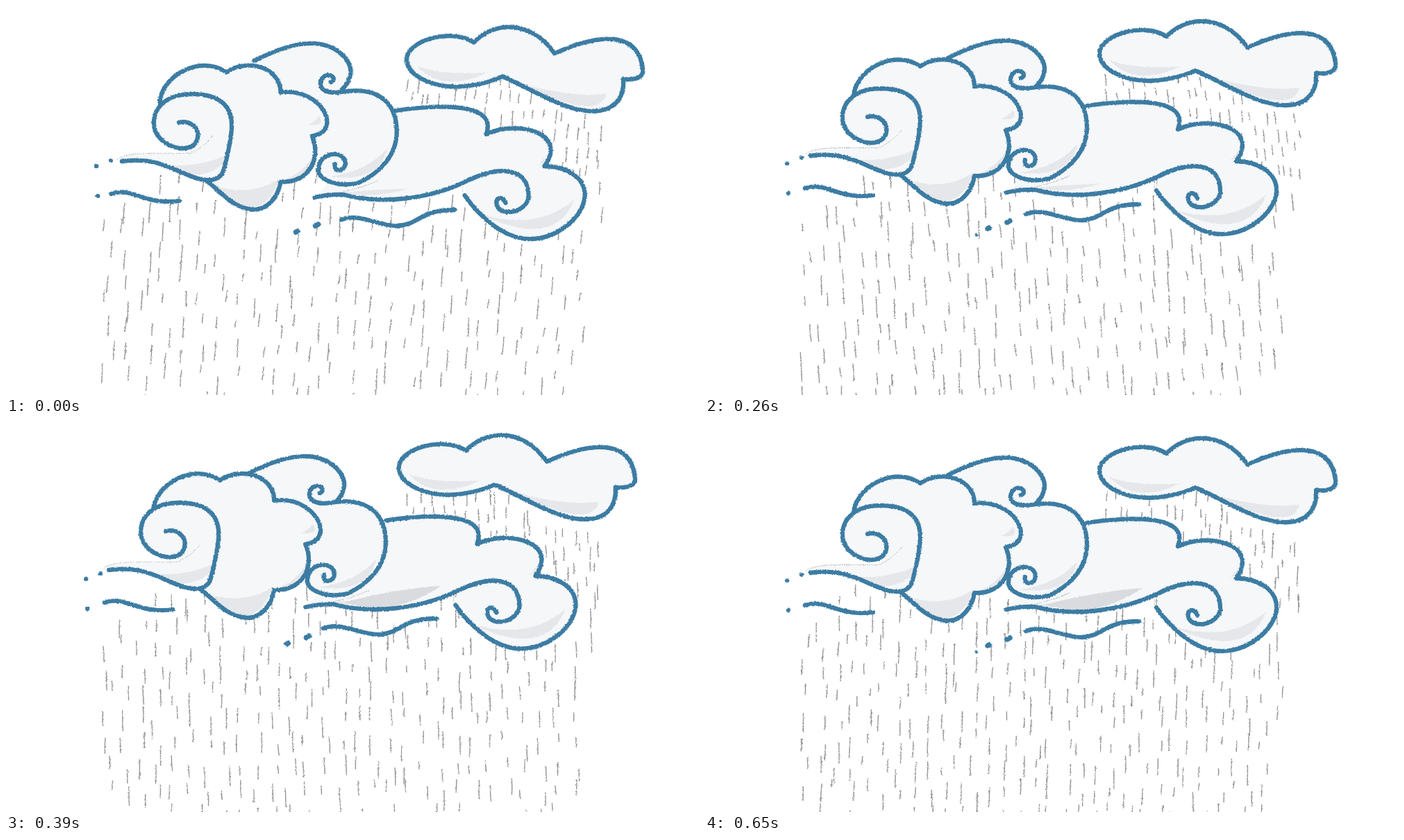
An HTML page for the animation above (780 ms loop, 998x561 px).

```html
<!DOCTYPE html>
<html lang="en">
<head>
<meta charset="utf-8">
<title>Rain clouds</title>
<style>
  html, body { margin: 0; width: 100%; height: 100%; overflow: hidden; background: #fff; }
  svg { display: block; width: 100%; height: 100%; }
</style>
</head>
<body>
<svg id="stage" viewBox="0 0 998 561">
  <defs>
    <filter id="chalk" filterUnits="userSpaceOnUse" x="0" y="0" width="998" height="561" color-interpolation-filters="sRGB">
      <feTurbulence type="fractalNoise" baseFrequency=".4" numOctaves="2" seed="4"/>
      <feDisplacementMap in="SourceGraphic" scale="3" xChannelSelector="R" yChannelSelector="G"/>
    </filter>
  </defs>
  <g id="scene" filter="url(#chalk)" fill="none" stroke-linecap="round" stroke-linejoin="round"></g>
</svg>
<script>
const INK = '#3c7ca3', BODY = '#f5f7f9', SHADE = '#e6e7ea';
const HOLD = 130, POSES = 6, MIDDLE = 2;

// Outlines shared by a fill and its ink line
const rightRim = `M665,44C690,16 745,8 781,60C820,42 900,15 908,82C910,92 902,99 880,97
  C882,125 866,142 840,143C800,146 750,112 706,93C685,103 662,107 640,108
  C604,108 568,92 568,68C569,42 630,22 665,44Z`;
const lowRim = `M550,144C600,137 700,128 681,178C725,157 800,175 765,224C795,224 825,240 823,268
  C820,300 780,330 742,329C705,328 670,295 650,266`;
const lowTail = 'C600,271 530,280 475,265Q455,264 434,269';
const backRim = 'M350,75C390,55 440,36 474,64C498,84 489,104 476,117';
const midRim = `M455,104C466,100 452,86 442,99C434,115 452,121 470,118C530,108 550,140 550,175
  C550,210 525,235 495,249C465,256 437,245 437,230C438,203 475,201 476,221C475,234 458,234 461,222`;
const leftRim = `M214,132C214,95 270,60 310,87C340,66 388,80 388,116C445,108 480,172 433,179
  C447,210 430,247 388,245C384,270 366,287 347,285C318,283 300,257 283,245`;
const headRim = `C256,206 218,200 203,178C190,158 200,118 255,119C300,120 311,142 310,168
  C309,185 303,213 298,230C292,246 272,246 250,237C222,226 200,210 152,216`;
const headTop = '145,213C165,200 215,206 252,204';

// Back to front, in the middle pose; dx and dy are the drift of each part
const parts = [
  { dx: 12, dy: 8.5, fill: rightRim, ink: rightRim,
    shade: 'M582,78Q620,118 685,87Q620,92 582,78M738,105Q845,160 856,118Q810,124 738,105' },
  { dx: 14, dy: 7, fill: `${lowRim}L652,246${lowTail}Z`,
    ink: `${lowRim}M709,277C703,264 692,271 697,282C704,296 736,292 742,270C744,225 700,222 652,246${lowTail}`,
    shade: 'M470,262Q520,272 570,256Q520,258 470,262M672,293Q780,345 808,272Q755,318 672,293M776,195Q777,215 755,223Q768,212 776,195',
    smudge: 'M490,262Q560,285 630,238Q560,243 490,262',
    pencil: 'M470,262Q500,256 525,245M650,266Q643,256 652,246' },
  { dx: 10, dy: 4, fill: `${backRim}L435,130L380,130Z`, ink: backRim,
    shade: 'M488,92Q486,108 474,116Q482,106 488,92' },
  { dx: 17, dy: 6, fill: `${midRim}L400,220V120Z`, ink: midRim,
    shade: 'M537,198Q525,250 453,240Q510,232 537,198' },
  { dx: 10, dy: 8.5, fill: `${leftRim}Z`, ink: leftRim,
    shade: 'M290,250Q358,318 387,240Q345,268 290,250M436,205Q440,240 392,243Q420,233 436,205M443,150Q455,165 427,163Q438,158 443,150' },
  { dx: 20, dy: 8, fill: `M261,182${headRim}L${headTop}Z`,
    ink: `M234,160C250,156 264,168 261,182${headRim}`,
    shade: 'M155,213Q285,262 306,205Q250,235 155,213',
    pencil: `M${headTop}Q272,194 284,178` },
  { dx: 10, dy: 8, ink: 'M144,263C175,252 190,280 242,273' },
  { dx: 28, dy: 8, ink: 'M462,300C490,290 515,310 545,309C575,306 575,286 625,286' },
  { dx: 16, dy: 4, ink: 'M139,219h0M118,227h.5M120,270h.5', width: 6 },
  { dx: 14, dy: 5, ink: 'M407,321l2,-1M435,312l4,-2', width: 7.5 },
  { dx: 30, dy: 0, ink: 'M391,330h0', width: 5, blinks: true }
];

const scene = document.getElementById('scene');
function add(parent, tag, attrs = {}) {
  const el = document.createElementNS('http://www.w3.org/2000/svg', tag);
  for (const k in attrs) el.setAttribute(k, attrs[k]);
  parent.appendChild(el);
  return el;
}

const rain = add(scene, 'path', { stroke: '#939393', 'stroke-width': 1.4 });
let smudge;
parts.forEach((p, i) => {
  p.group = add(scene, 'g');
  if (p.fill) {
    const id = 'cloud' + i;
    add(add(p.group, 'clipPath', { id }), 'path', { d: p.fill });
    add(p.group, 'path', { d: p.fill, fill: BODY });
    const inside = add(p.group, 'g', { 'clip-path': `url(#${id})` });
    add(inside, 'path', { d: p.shade, fill: SHADE });
    if (p.smudge) smudge = add(inside, 'path', { d: p.smudge, fill: '#d9dbdf' });
  }
  if (p.pencil) add(p.group, 'path', { d: p.pencil, stroke: '#aaa', 'stroke-width': .9, 'stroke-dasharray': '1 2' });
  add(p.group, 'path', { d: p.ink, stroke: INK, 'stroke-width': p.width || 6.3 });
});

function random(seed) {
  return () => {
    seed = (seed * 1664525 + 1013904223) % 4294967296;
    return seed / 4294967296;
  };
}

// Fresh rain for every pose: a jittered grid below the clouds
function drops(pose) {
  const rnd = random(97 + pose * 7919), lean = Math.cos(pose * 1.5), gap = 27 - pose;
  let d = '';
  const drop = (x, y, len) => {
    const tilt = lean * .8 + rnd() - .5, bend = rnd() * 2 - 1;
    d += `M${x + tilt},${y}Q${x + bend},${y + len / 2} ${x - tilt},${y + len}`;
  };
  for (let y = 232; y < 550; y += 35)
    for (let x = 138; x < 845 - (y - 232) * .12; x += gap) {
      const px = x + rnd() * gap * .7, py = y + rnd() * 24;
      if (py > 300 - (px - 135) * .9) drop(px, py, 10 + rnd() * 20);
    }
  for (let y = 92; y < 235; y += 26)
    for (let x = 575; x < 850; x += 16) {
      const px = x + rnd() * 12, py = y + rnd() * 14;
      const top = 94 + Math.min(58, Math.max(0, (px - 715) * .55));
      if (py > top) drop(px, py, 9 + rnd() * 13);
    }
  return d;
}

let shown = -1;
function draw(ms) {
  const pose = Math.floor(ms / HOLD) % POSES;
  if (pose === shown) return;
  shown = pose;
  // Drift up and left, slowing sideways; the last pose returns to the middle
  const step = pose === POSES - 1 ? MIDDLE : pose;
  const ease = n => (1 - n / 4) ** 2;
  const across = ease(step) - ease(MIDDLE), rise = 1 - step / MIDDLE;
  for (const p of parts) {
    p.group.setAttribute('transform', `translate(${p.dx * across} ${p.dy * rise})`);
    if (p.blinks) p.group.setAttribute('opacity', pose % 3 ? 1 : 0);
  }
  smudge.setAttribute('opacity', pose === 3 || pose === 5 ? 1 : 0);
  rain.setAttribute('d', drops(pose));
}

const start = performance.now();
function tick() {
  draw(performance.now() - start);
  requestAnimationFrame(tick);
}
tick();
</script>
</body>
</html>
```
